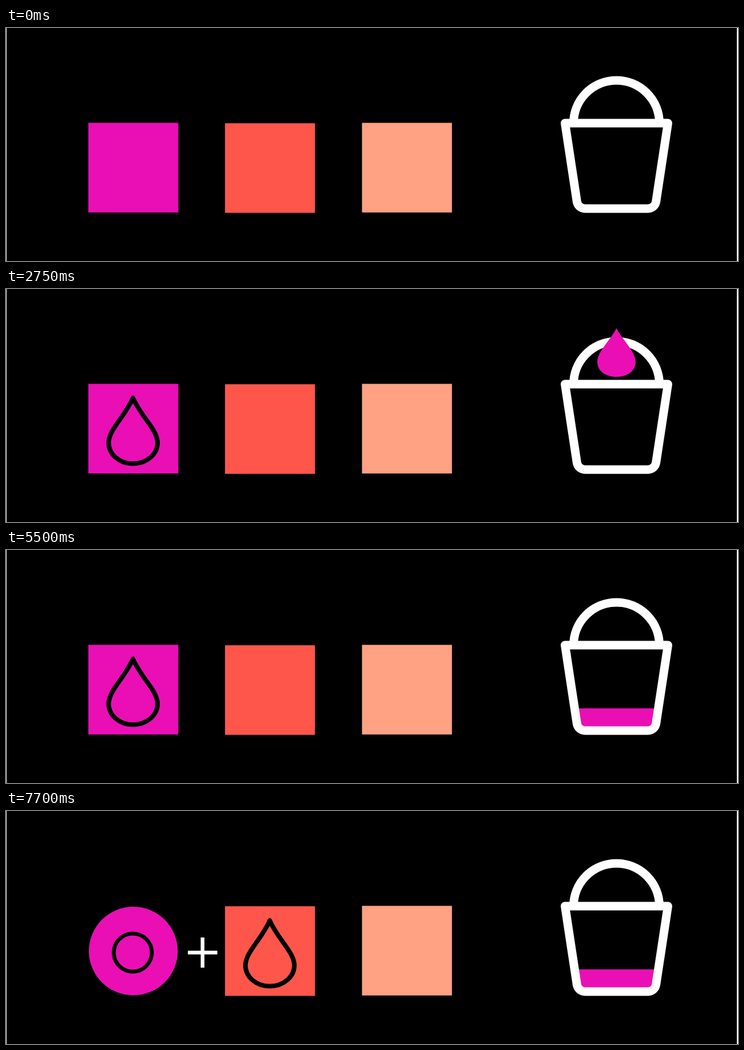
An HTML page that plays this animation: 1280x409 px, repeating every 8000 ms.

```html
<!DOCTYPE html>
<html lang="en">
<head>
<meta charset="utf-8">
<title>Drops in a bucket</title>
<style>
html, body { margin: 0; width: 100%; height: 100%; overflow: hidden; background: #000; }
svg { display: block; width: 100vw; height: 100vh; }
.line { fill: none; stroke: #000; stroke-width: 8; stroke-linejoin: round; }
.white { fill: none; stroke: #fff; stroke-width: 6.5; }
.bucket { fill: none; stroke: #fff; stroke-width: 15; stroke-linejoin: round; }
.pink { fill: #e90fb5; }
</style>
</head>
<body>
<svg viewBox="0 0 1280 409" preserveAspectRatio="none">
  <defs>
    <path id="outline" class="line" d="M222 191.2C208 224 179.5 247 179.5 270C179.5 290 198 306.5 222 306.5S265 290 265 270C265 247 236 224 222 191.2Z"/>
  </defs>
  <path fill="#fff" d="M0 0h1v409h-1zM1278 0h2v409h-2z"/>

  <rect class="pink" data-show="0 10" x="144" y="166.5" width="157.3" height="157.3"/>
  <rect fill="#ff564b" x="383" y="167.2" width="157.3" height="157.3"/>
  <rect fill="#ffa183" x="622.5" y="166.5" width="157.3" height="157.3"/>

  <use href="#outline" data-show="1 10"/>
  <g data-show="11 14">
    <circle class="pink" cx="222.6" cy="245.8" r="77.7"/>
    <circle class="line" cx="221.7" cy="248.5" r="33.3" style="stroke-width:6.8"/>
  </g>
  <path class="white" data-show="12 12" d="M322.5 213.5L366 244.5L322.5 275.5"/>
  <g data-show="14 14">
    <path class="white" d="M318 248.4h51.5M343.7 222v53"/>
    <use href="#outline" x="239.2" y="1"/>
  </g>

  <path class="bucket" d="M992.5 167a75 75 0 0 1 150 0"/>
  <path id="drop" class="pink" data-show="2 9" d="M0 0C-9 19-33.5 41-33.5 59C-33.5 75-19 85.5 0 85.5S33.5 75 33.5 59C33.5 41 9 19 0 0Z"/>
  <rect class="pink" data-show="10 14" x="998" y="278" width="139" height="36"/>
  <path class="bucket" d="M977.5 167H1157.5L1136.7 304.5A14.5 14.5 0 0 1 1122.5 317H1012.5A14.5 14.5 0 0 1 998.3 304.5Z"/>
</svg>
<script>
const LOOP = 8000, STEP = 550;
const drop = document.getElementById('drop');
const parts = [...document.querySelectorAll('[data-show]')].map(el => {
  const [from, to] = el.dataset.show.split(' ').map(Number);
  return { el, from, to };
});

// The drop falls evenly, then slows once it is inside the bucket.
const dropTop = step => step < 8 ? -58.5 + 42.4 * (step - 2) : 153 + 28.5 * (step - 7);

function draw(now) {
  const step = Math.floor(now % LOOP / STEP);
  for (const { el, from, to } of parts)
    el.style.display = step >= from && step <= to ? '' : 'none';
  drop.setAttribute('transform', `translate(1067.5 ${dropTop(step)})`);
}

const start = performance.now();
function tick() {
  draw(performance.now() - start);
  requestAnimationFrame(tick);
}
tick();
</script>
</body>
</html>
```
